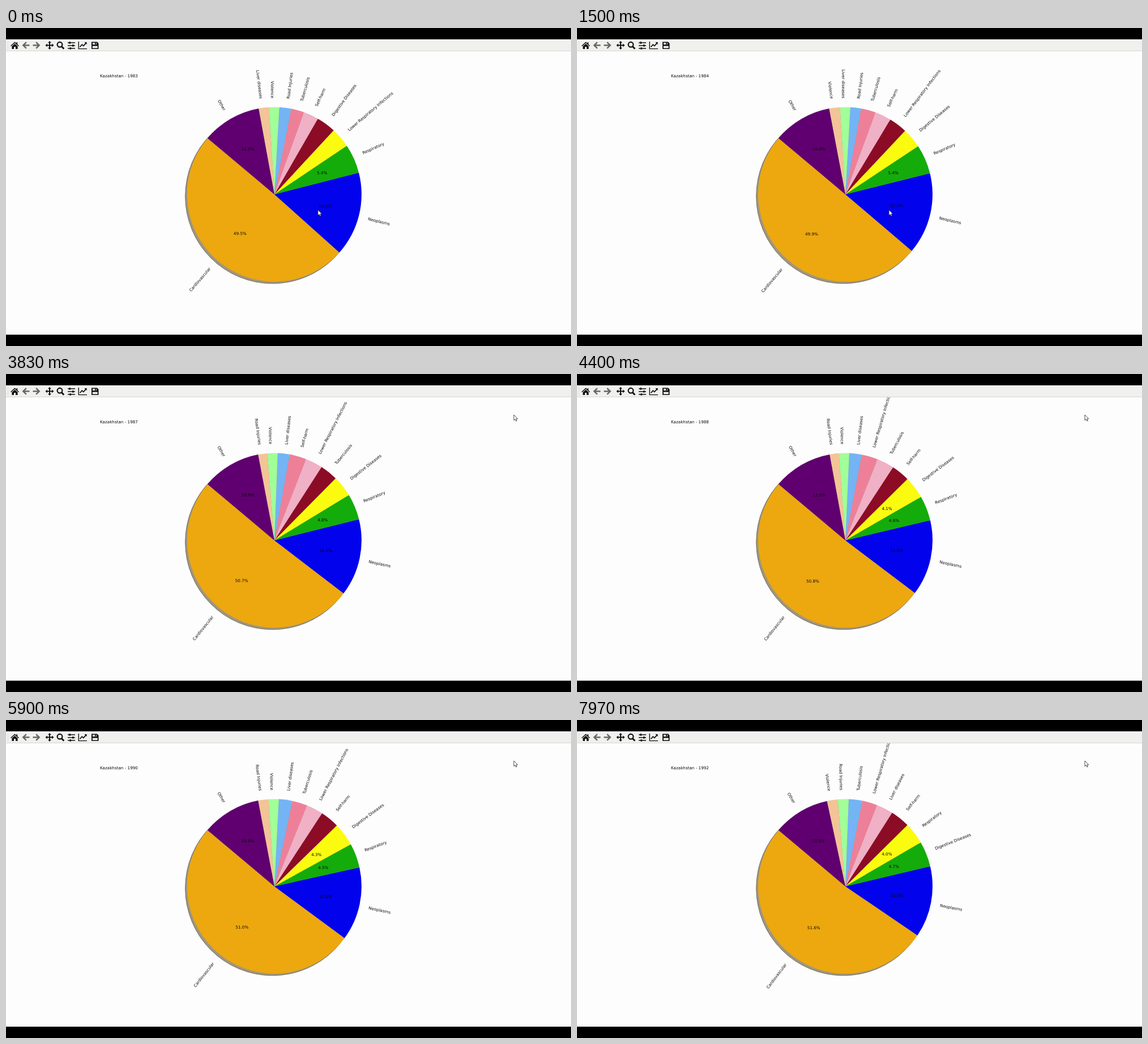
An HTML page that plays this animation: 998x561 px, repeating every 8 s.

```html
<!DOCTYPE html>
<html lang="en">
<head>
<meta charset="utf-8">
<title>Causes of death by year</title>
<style>
html, body { margin: 0; width: 100%; height: 100%; overflow: hidden; background: #000; }
svg { display: block; width: 100vw; height: 100vh; }
text { font: 7.2px "DejaVu Sans", sans-serif; fill: #0a0a0a; text-rendering: geometricPrecision; }
.line { fill: none; stroke: #111; stroke-width: 1.8; }
</style>
</head>
<body>
<svg viewBox="0 0 998 561">
  <defs><clipPath id="page"><rect y="41" width="998" height="500"/></clipPath></defs>
  <rect width="998" height="561"/>
  <rect y="20" width="998" height="521" fill="#fdfdfd"/>
  <rect y="20" width="998" height="20.5" fill="#f0f0ee"/>
  <rect y="40" width="998" height="1" fill="#d6d6d0"/>
  <path d="M3.5 24V38" stroke="#c4c4c0" stroke-dasharray="1 1.5"/>

  <g fill="#111">
    <path d="M8 31.3 15.5 24.5 18.4 27.1V25.2H20.2V28.8L23 31.3 22 32.3 15.5 26.6 9 32.3Z"/>
    <path d="M10.4 32.2 15.5 27.8 20.6 32.2V37H17V33.2H14V37H10.4Z"/>
    <path id="back" fill="#666" d="M28.5 30.5 35 24.2 36.7 25.9 33.4 29.2H41.5V31.8H33.4L36.7 35.1 35 36.8Z"/>
    <use href="#back" transform="matrix(-1 0 0 1 89 0)"/>
    <path d="M77 23 80 26.3H78V29.5H81.2V27.5L84.5 30.5 81.2 33.5V31.5H78V34.7H80L77 38 74 34.7H76V31.5H72.8V33.5L69.5 30.5 72.8 27.5V29.5H76V26.3H74Z"/>
    <circle class="line" cx="95" cy="29.3" r="4.4" style="stroke-width:2.2"/>
    <path class="line" d="M98.2 32.5 102.3 36.8" style="stroke-width:2.8"/>
    <path class="line" style="stroke-width:1.4" d="M109 26H122M109 31H122M109 36H122"/>
    <path d="M111.4 24.2H114V27.8H111.4ZM117 29.2H119.6V32.8H117ZM112.4 34.2H115V37.8H112.4Z"/>
    <path class="line" style="stroke-width:1.4" d="M128.3 24V36.6H143"/>
    <path class="line" d="M130.5 33.5 134.2 29.2 136.8 31.6 141.4 26.6"/>
    <path d="M138.4 25H142.6V29.2Z"/>
    <path fill-rule="evenodd" d="M151 24.5H161L163.5 27V37H151ZM153 26V29.2H159.8V26ZM152.8 31.8V35.6H161.7V31.8Z"/>
    <path d="M157 26H158.8V29H157Z"/>
  </g>

  <g clip-path="url(#page)">
    <text id="heading" x="166" y="87"></text>
    <circle cx="470.7" cy="296.8" r="154" fill="#a09680" stroke="#746b52"/>
    <g id="chart"></g>
  </g>
  <path id="cursor" fill="#fff" stroke="#222" stroke-width=".8" d="M0 0V9.6L2.2 7.6 3.8 11 5.4 10.3 3.9 7H6.8Z"/>
</svg>
<script>
const LOOP = 8000, YEAR_MS = 820, FIRST_CHANGE = 725;
const CX = 474, CY = 293.4, R = 154;
const ASCENT = 5.5, DESCENT = 1.5;

const colors = ["#eda80f", "#0202ec", "#14ac0b", "#fbfb10", "#8c0c26", "#f0b0c6",
  "#ed8098", "#74b4f4", "#a1ff98", "#f2c497", "#600070"];
const names = {
  C: "Cardiovascular", N: "Neoplasms", R: "Respiratory", I: "Lower Respiratory Infections",
  D: "Digestive Diseases", S: "Self-harm", T: "Tuberculosis", J: "Road Injuries",
  V: "Violence", L: "Liver diseases", O: "Other"
};
// Ranked causes and their shares; "Other" takes the rest.
const years = [
  ["CNRIDSTJVLO", 49.5, 15.6, 5.4, 3.7, 3.6, 2.8, 2.4, 2.2, 1.9, 1.9],
  ["CNRDISTJLVO", 49.9, 15.1, 5.4, 3.7, 3.4, 3, 2.7, 2, 1.9, 2],
  ["CNRDISTLVJO", 50.1, 14.8, 5.2, 3.8, 3.3, 3.1, 2.9, 2.1, 1.9, 1.9],
  ["CNRDTISLVJO", 50.3, 14.5, 5, 3.9, 3.3, 3.2, 3.1, 2.1, 1.9, 1.8],
  ["CNRDTISLVJO", 50.7, 14.3, 4.8, 3.9, 3.3, 3.2, 3.1, 2.2, 1.9, 1.7],
  ["CNRDSTILVJO", 50.8, 14, 4.6, 4.1, 3.4, 3.2, 3, 2.3, 1.9, 1.7],
  ["CNRDSTILVJO", 50.9, 13.8, 4.4, 4.2, 3.5, 3.2, 2.9, 2.4, 1.9, 1.8],
  ["CNRDSITLVJO", 51, 13.6, 4.5, 4.3, 3.5, 3.1, 2.8, 2.5, 1.9, 1.9],
  ["CNDRSILTVJO", 51.3, 13.4, 4.6, 4.2, 3.5, 3, 2.8, 2.7, 1.9, 1.9],
  ["CNDRSLITJVO", 51.6, 13.2, 4.7, 4, 3.6, 3.1, 2.8, 2.5, 2, 2]
];

const $ = id => document.getElementById(id);
const chart = $("chart"), heading = $("heading"), cursor = $("cursor");

function add(tag, attrs, content = "") {
  const node = document.createElementNS("http://www.w3.org/2000/svg", tag);
  for (const key in attrs) node.setAttribute(key, attrs[key]);
  node.textContent = content;
  return chart.appendChild(node);
}

function polar(degrees, radius) {
  const a = degrees * Math.PI / 180;
  return [CX + radius * Math.cos(a), CY - radius * Math.sin(a)];
}

function addWedge(from, to, fill) {
  const large = to - from > 180 ? 1 : 0;
  add("path", { fill, d: `M${CX} ${CY}L${polar(from, R)}A${R} ${R} 0 ${large} 0 ${polar(to, R)}Z` });
}

// Puts the rotated text's bounding box with its inner corner on the anchor point.
function addLabel(angle, content) {
  const [ax, ay] = polar(angle, R * 1.1);
  const left = ax < CX, above = ay < CY;
  const turn = -angle + (left ? 180 : 0), a = turn * Math.PI / 180;
  const node = add("text", {}, content), width = node.getComputedTextLength();
  const corners = [[0, -ASCENT], [width, -ASCENT], [0, DESCENT], [width, DESCENT]];
  const xs = corners.map(([x, y]) => x * Math.cos(a) - y * Math.sin(a));
  const ys = corners.map(([x, y]) => x * Math.sin(a) + y * Math.cos(a));
  const x = ax - (left ? Math.max(...xs) : Math.min(...xs));
  const y = ay - (above ? Math.max(...ys) : Math.min(...ys));
  node.setAttribute("transform", `translate(${x} ${y}) rotate(${turn})`);
}

function drawYear(index) {
  const [order, ...shares] = years[index];
  shares.push(100 - shares.reduce((sum, share) => sum + share, 0));
  heading.textContent = `Kazakhstan - ${1983 + index}`;
  chart.replaceChildren();
  let angle = 140;
  const slices = shares.map((share, i) => {
    const from = angle;
    angle += share * 3.6;
    addWedge(from, angle, colors[i]);
    return { share, middle: (from + angle) / 2, name: names[order[i]] };
  });
  for (const { share, middle, name } of slices) {
    addLabel(middle, name);
    if (share < 3.95) continue;
    const [x, y] = polar(middle, R * 0.6);
    add("text", { x, y: y + 2, "text-anchor": "middle" }, share.toFixed(1) + "%");
  }
}

let shown = -1;
function frame() {
  const t = performance.now() % LOOP;
  const index = Math.min(years.length - 1, Math.max(0, Math.floor((t - FIRST_CHANGE) / YEAR_MS) + 1));
  if (index !== shown) drawYear(shown = index);
  const p = Math.min(1, Math.max(0, (t - 1560) / 340)), ease = p * p * (3 - 2 * p);
  cursor.setAttribute("transform", `translate(${551 + 346 * ease} ${321 - 249 * ease})`);
  requestAnimationFrame(frame);
}
frame();
</script>
</body>
</html>
```
